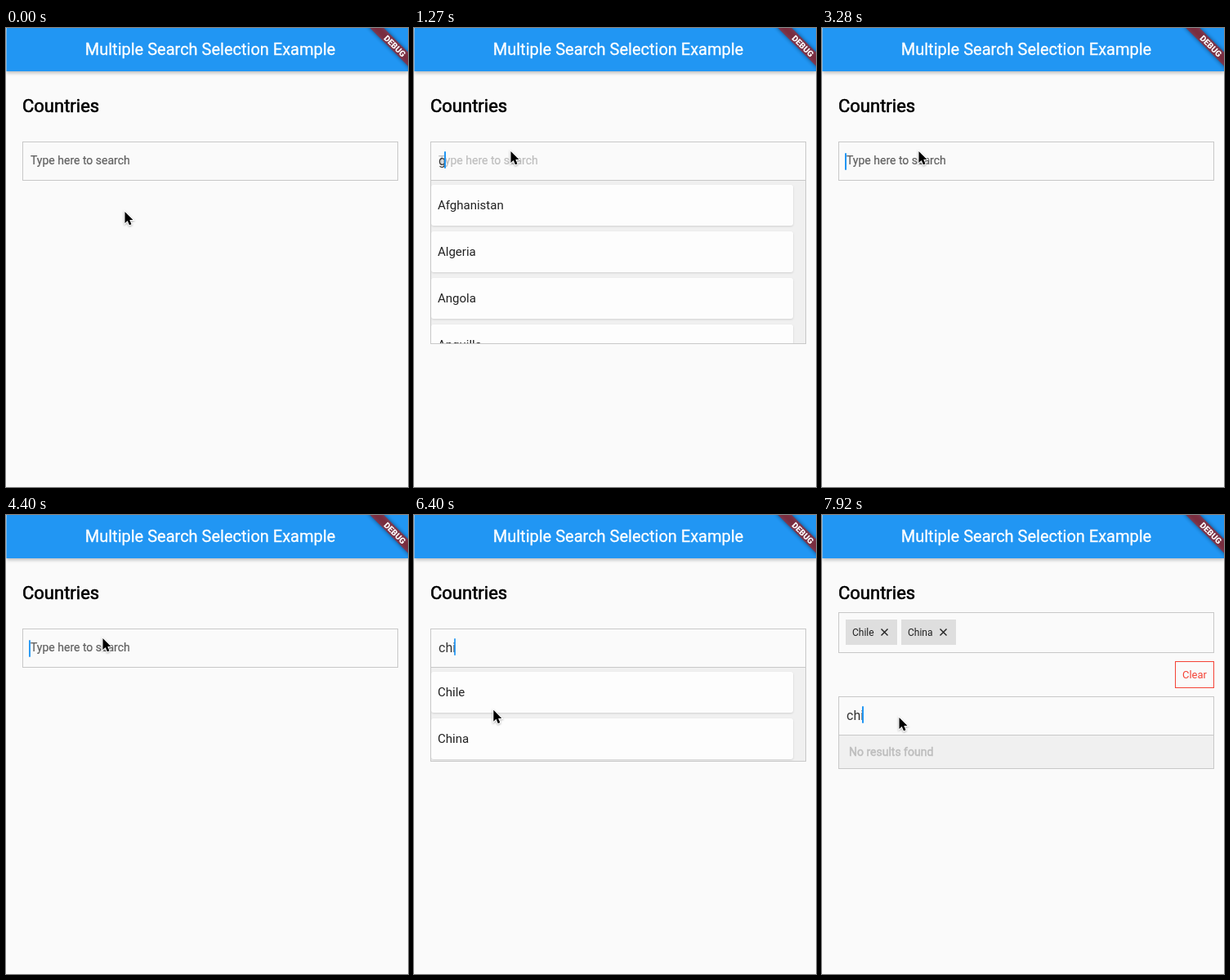
Write an HTML page that moves like this. It is 492 px wide and 562 px high and loops after 8 s.

```html
<!DOCTYPE html>
<html lang="en">
<head>
<meta charset="utf-8">
<title>Multiple Search Selection Example</title>
<style>
  html, body { margin: 0; width: 100%; height: 100%; overflow: hidden; background: #fafafa; }
  svg { display: block; width: 492px; height: 562px; font-family: Roboto, sans-serif; }
  text { white-space: pre; }
  .bar { fill: #2196f3; filter: drop-shadow(0 2px 2px rgba(0, 0, 0, .26)); }
  .title { font-size: 20px; fill: #fff; stroke: #fff; stroke-width: .3px; }
  .head { font-size: 22px; stroke: #000; stroke-width: .6px; }
  .debug { font-size: 10.2px; font-weight: 900; fill: #fff; }
  .box { fill: none; stroke: #c8c8c8; }
  .panel { fill: #f0f0f0; }
  .card { fill: #fdfdfd; filter: drop-shadow(0 1px 1px rgba(0, 0, 0, .13)); }
  .row { font-size: 15px; fill: #212121; }
  .typed { font-size: 16px; fill: #333; }
  .hint { font-size: 14px; fill: #606060; stroke: #606060; stroke-width: .2px; }
  .caret { fill: #2196f3; }
  .thumb, .chip { fill: #dedede; }
  .chipText { font-size: 12px; fill: #212121; }
  .cross { stroke: #212121; stroke-width: 1.4; }
  .clear { font-size: 13px; fill: #f44336; }
  .clearBox { fill: none; stroke: #f44336; }
  .none { font-size: 14px; fill: #bdbdbd; stroke: #bdbdbd; stroke-width: .5px; }
  .arrow { stroke: #fff; stroke-width: 2; paint-order: stroke; filter: drop-shadow(0 1px 1px rgba(0, 0, 0, .3)); }
</style>
</head>
<body>
<svg viewBox="0 0 492 562">
  <clipPath id="clip"><rect x="20" y="187" width="459" height="199"/></clipPath>
  <rect class="bar" x=".5" width="492" height="53"/>
  <text class="title" x="250" y="33" text-anchor="middle">Multiple Search Selection Example</text>
  <g transform="translate(500 -2) rotate(45)">
    <rect x="-40" y="28" width="80" height="12" fill="#000" opacity=".5" style="filter: blur(2.5px)"/>
    <rect x="-40" y="28" width="80" height="12" fill="#b71c1c" opacity=".627"/>
    <text class="debug" y="37.7" text-anchor="middle">DEBUG</text>
  </g>
  <text class="head" x="20" y="103">Countries</text>
  <g id="scene"></g>
</svg>
<script>
const LOOP = 8000, FOCUS = 680, REFOCUS = 7920;
const scene = document.getElementById('scene');
const pen = document.createElement('canvas').getContext('2d');

const countries = ['Afghanistan', 'Algeria', 'American Samoa', 'Angola', 'Anguilla', 'Antarctica',
  'Cambodia', 'Cameroon', 'Chad', 'Chile', 'China', 'Christmas Island', 'Greece', 'Greenland',
  'Grenada', 'Saint Vincent and the Grenadines', 'Serbia and Montenegro'];

const typing = [[0, ''], [1180, 'g'], [1520, 'gr'], [1730, 'gre'], [2810, 'gr'], [2990, 'g'],
  [3130, ''], [4750, 'c'], [4870, 'ch'], [5140, 'chi']];
const picks = [[6740, 'Chile'], [7420, 'China']];

// mouse glides: start, end, x, y
const glides = [[170, 500, 104, 151], [1010, 1011, 118, 151], [6250, 6400, 97, 239],
  [6400, 6700, 71, 217], [6750, 7000, 50, 263], [7070, 7240, 47, 297], [7420, 7920, 94, 248]];

const clamp = v => Math.max(0, Math.min(1, v));
const past = (list, t) => list.filter(e => e[0] <= t);

function width(str, size) {
  pen.font = `${size}px Roboto, sans-serif`;
  return pen.measureText(str).width;
}

function mouse(t) {
  let x = 145, y = 225;
  for (const [from, to, gx, gy] of glides) {
    const p = clamp((t - from) / (to - from)), ease = p * (2 - p);
    x += (gx - x) * ease;
    y += (gy - y) * ease;
  }
  return [x, y];
}

// Solid after each key press, then blinking once a second with soft fades
function caret(t, lastKey) {
  if (t < FOCUS || (t >= picks[0][0] && t < REFOCUS)) return 0;
  const age = t - Math.max(FOCUS, lastKey) - 640;
  if (age < 0 || t >= REFOCUS) return 1;
  const p = age % 1000;
  return p < 490 ? 1 - clamp(p / 200) : clamp((p - 490) / 150);
}

function hint(t) {
  const keys = past(typing, t);
  return keys.reduce((v, [time, str], i) => {
    if (i && !str === !keys[i - 1][1]) return v;
    const p = i ? clamp((t - time) / 150) : 1;
    return str ? 1 - p : p;
  }, 1);
}

const rect = (cls, x, y, w, h, more = '') =>
  `<rect class="${cls}" x="${x}" y="${y}" width="${w}" height="${h}" ${more}/>`;
const text = (cls, x, y, str, more = '') => `<text class="${cls}" x="${x}" y="${y}" ${more}>${str}</text>`;

function chosen(names) {
  let x = 29, out = rect('box', 20.5, 119.5, 459, 49);
  for (const name of names) {
    const w = Math.ceil(width(name, 12)) + 36;
    out += rect('chip', x, 128, w, 31) + text('chipText', x + 8, 148, name) +
      `<path class="cross" d="M${x + w - 19.5} 139.5l8 8m0 -8l-8 8"/>`;
    x += w + 5;
  }
  return out + rect('clearBox', 432.5, 179.5, 47, 32) +
    text('clear', 456, 200, 'Clear', 'text-anchor="middle"');
}

function dropdown(rows, thumb) {
  const h = rows.length ? Math.min(200, rows.length * 57 + 1) : 41;
  const cards = rows.map((name, i) =>
    rect('card', 21, 192 + i * 57, 443, 50, 'rx="3"') + text('row', 29, 222 + i * 57, name)).join('');
  return rect('panel', 20, 186, 460, h + 1) +
    `<g clip-path="url(#clip)">${cards}${thumb ? rect('thumb', 469, 187, 10, 30, 'rx="4"') : ''}</g>` +
    (rows.length ? '' : text('none', 33, 212, 'No results found')) +
    rect('box', 20.5, 186.5, 459, h);
}

function draw(t) {
  const [lastKey, typed] = past(typing, t).pop();
  const names = past(picks, t).map(p => p[1]);
  const rows = countries.filter(c => c.toLowerCase().includes(typed) && !names.includes(c));
  const thumb = typed.length > 1 && rows.length > 3;
  const caretX = 28 + Math.round(width(typed, 16) - .2);

  scene.innerHTML = (names.length ? chosen(names) : '') +
    `<g transform="translate(0 ${names.length ? 83 : 0})">` +
    (typed ? dropdown(rows, thumb) : '') +
    rect('box', 20.5, 139.5, 459, 47) +
    text('hint', 30, 167, 'Type here to search', `opacity="${hint(t)}"`) +
    text('typed', 30, 168, typed) +
    rect('caret', caretX, typed ? 151 : 153, 2, 21, `rx="1" opacity="${caret(t, lastKey)}"`) +
    '</g>' +
    `<path class="arrow" transform="translate(${mouse(t)})" d="M.5 0V14L3.7 11L6 16.3L8.5 15.2L6.3 10.1H10.5Z"/>`;
}

const start = performance.now();
function frame() {
  draw((performance.now() - start) % LOOP);
  requestAnimationFrame(frame);
}
frame();
</script>
</body>
</html>
```
